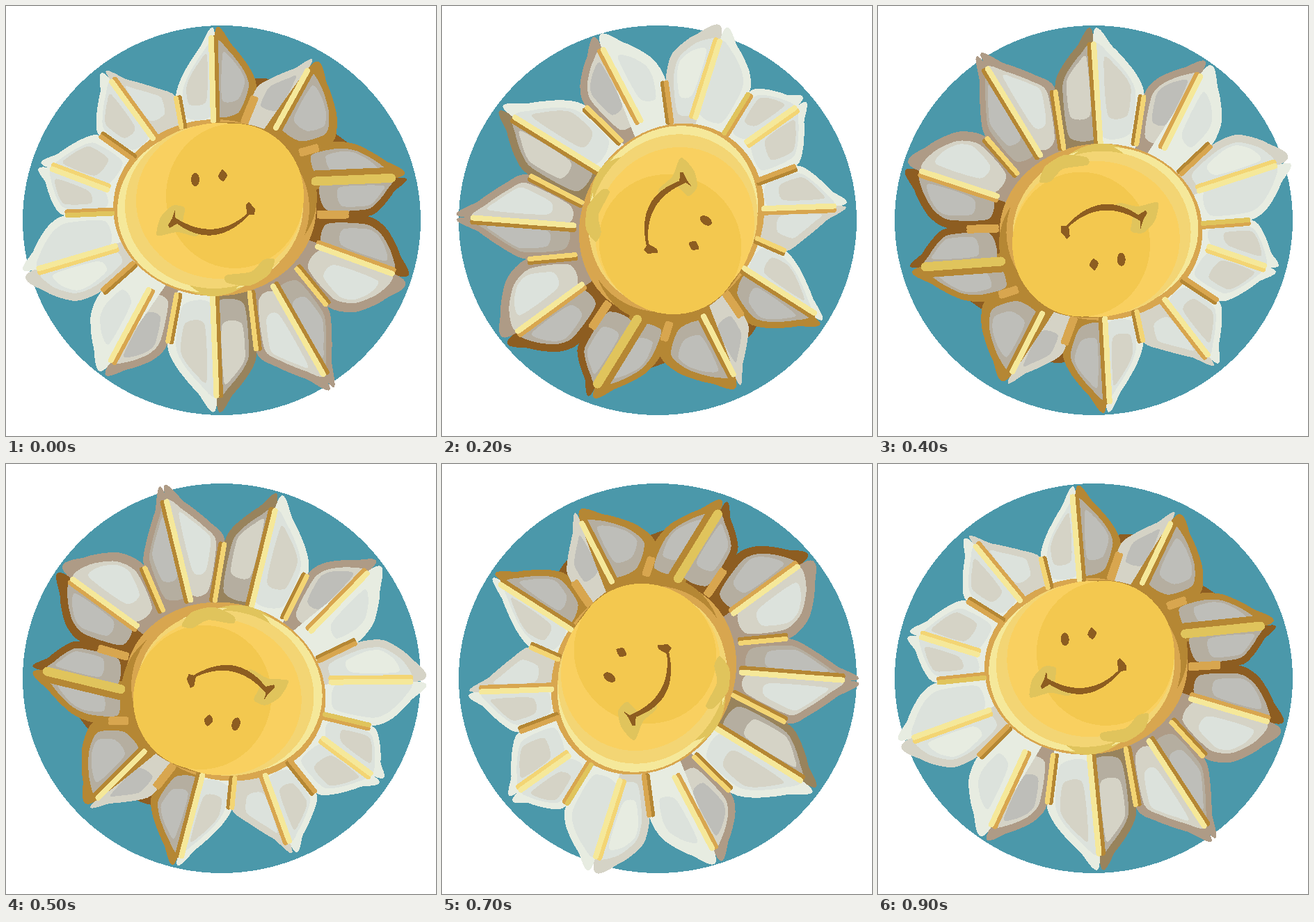
An HTML page for the animation above (1000 ms loop, 618 by 618 pixels).

```html
<!DOCTYPE html>
<html lang="en">
<head>
<meta charset="utf-8">
<title>Spinning flower cookie</title>
<style>
html, body { margin: 0; width: 100%; height: 100%; overflow: hidden; background: #fff; }
svg { display: block; width: 100vw; height: 100vh; }
</style>
</head>
<body>
<svg viewBox="0 0 618 618" shape-rendering="crispEdges">
  <ellipse cx="310" cy="308" rx="286" ry="280" fill="#4b98aa"/>
  <g id="cookie"></g>
</svg>
<script>
const colors = {
  w: '#e7ece1', p: '#dce2dc', b: '#d5d3c6', g: '#bebeb9', t: '#b5aea0', c: '#ae9b86',
  o: '#98835c', n: '#8d5d21', d: '#b58734', a: '#d8a64f', y: '#f3c84f', f: '#f9d060',
  u: '#f3d574', l: '#f5e89a', m: '#e0c45c'
};
const cookie = document.getElementById('cookie');
const pairs = text => text.split(' ').map(s => s.split(',').map(Number));
const lerp = (p, q, t) => p.map((v, i) => v + (q[i] - v) * t);

function add(tag, attrs) {
  const el = document.createElementNS('http://www.w3.org/2000/svg', tag);
  for (const key in attrs) el.setAttribute(key, attrs[key]);
  cookie.append(el);
}

// Slightly rounded closed curve through all points.
function blob(color, pts) {
  const n = pts.length, k = 0.12;
  let d = 'M' + pts[0];
  for (let i = 0; i < n; i++) {
    const [a, b, c, e] = [n - 1, 0, 1, 2].map(j => pts[(i + j) % n]);
    d += `C${b.map((v, j) => v + (c[j] - a[j]) * k)} ${c.map((v, j) => v - (e[j] - b[j]) * k)} ${c}`;
  }
  add('path', { d: d + 'Z', fill: colors[color] });
}

function line(color, width, p, q) {
  add('path', { d: `M${p}L${q}`, stroke: colors[color], 'stroke-width': width, 'stroke-linecap': 'round' });
}

function ellipse(color, cx, cy, rx, ry) {
  add('ellipse', { cx, cy, rx, ry, fill: colors[color] });
}

// Icing ridge, its shaded flank facing right.
function ridge(light, dark, width, p, q) {
  const dx = q[0] - p[0], dy = q[1] - p[1], len = Math.hypot(dx, dy);
  const s = (-dy - dx * 0.2 > 0 ? 1 : -1) * width * 0.7 / len;
  const shift = ([x, y]) => [x - dy * s, y + dx * s];
  line(dark, width, shift(p), shift(q));
  line(light, width, p, q);
}

// Ten petals clockwise from the top; gaps follow each petal.
const center = [300, 290];
const tips = pairs('300,40 437,86 563,247 564,388 462,540 303,572 146,518 38,380 60,232 147,102');
const bases = pairs('298,165 388,175 445,252 448,346 384,403 297,418 205,408 157,345 145,264 211,190');
const gaps = pairs('360,118 470,195 520,302 462,432 360,498 232,486 137,410 84,301 134,186 244,130');
const roots = pairs('341,165 424,208 450,302 418,378 350,412 245,415 182,370 153,298 182,220 252,174');
const bulges = pairs('8,10 5,16 13,8 16,23 6,8 10,11 14,18 24,13 10,9 8,4');
// Edge, middle and core tones of both halves of each petal.
const tones = 'wpb,dtg bbg,dtg dtg,ntg ntg,cbp ctg,cbp otb,wpb cbg,wwp bpw,wpp wpb,wpb wpb,bbp'.split(' ');

function half(i, side) {
  const j = side ? i : (i + 9) % 10;
  const tip = tips[i], gap = gaps[j], base = bases[i];
  const ex = tip[0] - gap[0], ey = tip[1] - gap[1];
  const b = bulges[i][side] * (side ? -1 : 1) / Math.hypot(ex, ey);
  const bulge = t => lerp(gap, tip, t).map((v, k) => v + b * (k ? -ex : ey));
  const pts = [base, roots[j], gap, bulge(0.3), bulge(0.72), tip];
  const [edge, middle, core] = tones[i].split(',')[side];
  const spine = lerp(base, tip, 0.5);
  const mid = lerp(spine, bulge(0.2), 0.45);
  blob(edge, [center, ...pts.slice(1)]);
  blob(middle, pts.map(p => lerp(spine, p, 0.82)));
  blob(core, pts.map(p => lerp(mid, p, 0.53)));
}

blob('n', pairs('464,145 474,157 468,178 500,210 440,260 400,200'));
blob('n', pairs('352,106 380,106 364,126 345,135'));
tips.forEach((_, i) => { half(i, 0); half(i, 1); });

ellipse('a', 300, 290, 146, 127);
ellipse('d', 317, 275, 130, 108);

const ridgeTones = 'ld ld md la ld ld la lu lu la'.split(' ');
const gapTones = 'aa aa aa ud ud ud ad ma ad ud'.split(' ');
tips.forEach((tip, i) => {
  const outer = i ? lerp(bases[i], tip, 0.92) : [295, 46];
  ridge(...ridgeTones[i], i === 2 ? 13 : 8, bases[i], outer);
  const end = i > 2 ? gaps[i] : lerp(roots[i], gaps[i], [0.75, 0.5, 0.6][i]);
  ridge(...gapTones[i], 7, roots[i], lerp(end, roots[i], 0.06));
});

// Face, from the rim inwards.
ellipse('a', 300, 291, 136, 121);
ellipse('m', 297, 300, 95, 117);
ellipse('l', 291, 294, 131, 118);
ellipse('m', 300, 300, 72, 117);
ellipse('u', 299, 288, 128, 118);
ellipse('f', 307, 280, 120, 112);
ellipse('y', 329, 273, 99, 104);
blob('m', pairs('316,387 352,382 370,365 386,364 378,386 350,402 318,398'));
blob('m', pairs('239,287 257,290 255,312 282,322 272,331 246,325 217,330 222,304'));
ellipse('n', 272, 249.5, 6, 9.5);
blob('n', pairs('311,235 318,243 312,252 305,245'));
add('path', {
  d: 'M243 293V304Q298 340 346 299L345 285 349 281 358 292 357 300H350Q300 352 246 313L235 319 233 315 239 305Z',
  fill: colors.n
});

// Uneven turn, each pose held for 100 ms.
const angles = [0, 54, 124, 148, 178.3, 196, 233.5, 304, 275.3, 356.6];
const start = performance.now();

function tick() {
  const step = Math.floor((performance.now() - start) / 100) % angles.length;
  cookie.setAttribute('transform', `rotate(${angles[step]} 310 307.5)`);
  requestAnimationFrame(tick);
}
tick();
</script>
</body>
</html>
```
